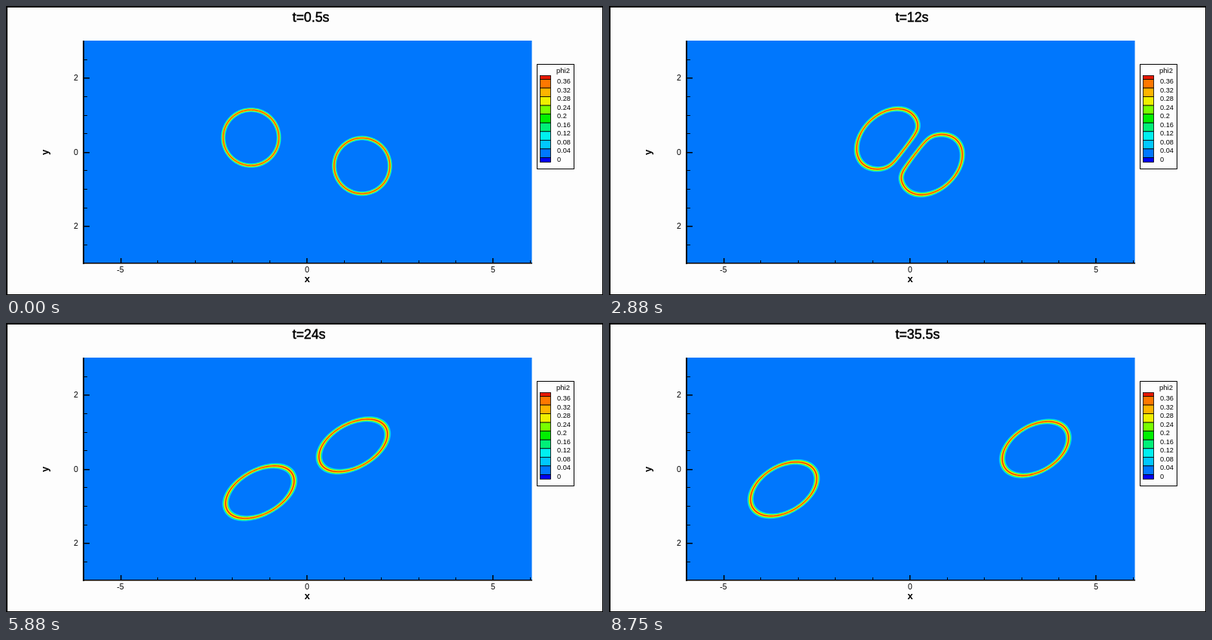
These frames come from a looping animation (793x384 px, 8.87 s). An HTML page:

```html
<!DOCTYPE html>
<html lang="en">
<head>
<meta charset="utf-8">
<title>Droplets in shear flow</title>
<style>
  html, body { margin: 0; width: 100%; height: 100%; overflow: hidden; background: #fdfdfd; }
  svg { display: block; width: 793px; height: 384px; }
  text { font-family: "Liberation Sans", Arial, sans-serif; fill: #000; }
</style>
</head>
<body>
<svg id="stage" viewBox="0 0 793 384" xmlns="http://www.w3.org/2000/svg"></svg>
<script>
const stage = document.getElementById('stage');
const ORIGIN = { x: 399.2, y: 193.7 };
const UNIT = { x: 49.45, y: 49.2 };
const PLOT = { left: 103, top: 46, right: 698.5, bottom: 341.5 };
const LOOP = 8870;
const STEP = 125;
const RAD = Math.PI / 180;

function add(tag, attrs, text) {
  const node = document.createElementNS('http://www.w3.org/2000/svg', tag);
  for (const key in attrs) node.setAttribute(key, attrs[key]);
  if (text !== undefined) node.textContent = text;
  return stage.appendChild(node);
}
const rect = (x, y, width, height, fill, extra) => add('rect', { x, y, width, height, fill, ...extra });
const label = (x, y, size, text, extra) => add('text', { x, y, 'font-size': size, ...extra }, text);

// Page frame and plot area
rect(0, 0, 793, 384, '#fdfdfd');
rect(0, 0, 793, 2, '#000');
rect(0, 0, 2, 384, '#000');
rect(792, 0, 1, 384, '#000');
rect(0, 383, 793, 1, '#000');
rect(PLOT.left, PLOT.top, PLOT.right - PLOT.left, PLOT.bottom - PLOT.top, '#0077fd');

// Contour layers from the outside to the ridge: colour and relative width
const LAYERS = [
  ['#00b4ff', 1], ['#00f0e0', 0.83], ['#3cf03c', 0.65],
  ['#f4f000', 0.48], ['#ffa000', 0.28], ['#e83000', 0.12]
].map(([fill, width]) => ({ width, path: add('path', { fill, 'fill-rule': 'evenodd' }) }));

// Axes
rect(102, 46, 2, 297, '#000');
rect(102, 341, 597, 1.5, '#000');
for (let i = -5; i <= 5; i++) {
  const major = i % 4 === 0;
  rect(104, Math.round(ORIGIN.y - i * UNIT.y / 2), major ? 7 : 4, major ? 1.5 : 1, '#000');
}
for (let i = -5; i <= 6; i++) {
  const size = i % 5 === 0 ? 6 : 3;
  rect(Math.round(ORIGIN.x + i * UNIT.x), 341 - size, size > 3 ? 1.5 : 1, size, '#000');
}
const centred = { 'text-anchor': 'middle' };
[['2', 99], ['0', 198], ['2', 296]].forEach(([text, y]) => label(93, y, 10.5, text, centred));
[['-5', 152], ['0', 400], ['5', 647]].forEach(([text, x]) => label(x, 353.5, 10.5, text, centred));
const bold = { ...centred, 'font-weight': 'bold' };
label(400, 367, 13, 'x', bold);
label(0, 0, 13, 'y', { ...bold, transform: 'translate(56 194.5) rotate(-90)' });

// Legend
rect(705.5, 77.5, 49, 139, '#fdfdfd', { stroke: '#000' });
label(731, 89, 9.5, 'phi2');
['#e81800', '#ff7800', '#ffb400', '#f0f000', '#78ff00', '#00f000',
  '#00f078', '#00f0f0', '#00c8ff', '#0078ff', '#0000f0'].forEach((fill, i) => {
  const top = i ? 97.5 + 11.55 * (i - 1) : 92.5;
  const bottom = i < 10 ? 97.5 + 11.55 * i : 207.5;
  rect(709.5, top, 14, bottom - top, fill, { stroke: '#000', 'stroke-width': 0.8 });
  if (i) label(732, 103 + 11.5 * (i - 1), 9.2, String((10 - i) * 4 / 100));
});

const title = label(380.5, 20.5, 17.8, '', { stroke: '#000', 'stroke-width': 0.5 });

// time, centre x and y, semi-axes, tilt, angle of the plane between the drops
const POSES = [
  [0.5, -73.7, -18.7, 37, 37, 45, 76],
  [3.5, -60.3, -16.5, 43, 31.5, 43, 69],
  [7, -46.8, -14.7, 45.8, 29.3, 41, 60],
  [12, -29.2, -17, 46.7, 33.3, 43, 53],
  [18, 1.8, -30.2, 49, 34, 27, 10],
  [21, 31, -33.2, 50, 31.5, 28, -30],
  [24, 62, -31, 49.5, 29, 29, -63],
  [28.5, 102, -29, 48.6, 30.3, 29, -72],
  [35.5, 167.2, -26.9, 48, 30.4, 31, -80]
];

function slope(i, col) {
  const rise = j => (POSES[j + 1][col] - POSES[j][col]) / (POSES[j + 1][0] - POSES[j][0]);
  if (i === 0) return rise(0);
  if (i === POSES.length - 1) return rise(i - 1);
  const before = rise(i - 1), after = rise(i);
  return before * after > 0 ? 2 * before * after / (before + after) : 0;
}

// Monotone cubic interpolation between poses
function poseAt(t) {
  let i = 0;
  while (i < POSES.length - 2 && t > POSES[i + 1][0]) i++;
  const from = POSES[i], to = POSES[i + 1];
  const span = to[0] - from[0], u = (t - from[0]) / span;
  return from.map((value, col) => {
    const ease = u * u * (3 - 2 * u);
    const bend = u * (1 - u) * ((1 - u) * slope(i, col) - u * slope(i + 1, col));
    return value + (to[col] - value) * ease + span * bend;
  });
}

// Tilted ellipse, softly flattened where it meets the plane between the drops
function outline([, cx, cy, a, b, tilt, plane]) {
  const GAP = 7.5, SOFT = 3, COUNT = 120;
  const cos = Math.cos(tilt * RAD), sin = Math.sin(tilt * RAD);
  const nx = -Math.sin(plane * RAD), ny = -Math.cos(plane * RAD);
  return Array.from({ length: COUNT }, (_, i) => {
    const angle = i / COUNT * 2 * Math.PI;
    const u = a * Math.cos(angle), v = b * Math.sin(angle);
    const x = cx + u * cos - v * sin, y = cy - u * sin - v * cos;
    const distance = x * nx + y * ny;
    const push = GAP + SOFT * Math.log1p(Math.exp((distance - GAP) / SOFT)) - distance;
    const end = Math.cos(angle) ** 2 * (a - b) / 18;
    return { x: x + push * nx, y: y + push * ny, half: 3.1 + 1.4 * end };
  });
}

function offsetPath(points, amount, sign) {
  const n = points.length;
  return 'M' + points.map((p, i) => {
    const prev = points[(i + n - 1) % n], next = points[(i + 1) % n];
    const dx = next.x - prev.x, dy = next.y - prev.y;
    const scale = amount * p.half / Math.hypot(dx, dy);
    const x = ORIGIN.x + sign * (p.x - dy * scale);
    const y = ORIGIN.y + sign * (p.y + dx * scale);
    return x.toFixed(2) + ' ' + y.toFixed(2);
  }).join('L') + 'Z';
}

function draw(step) {
  const t = 0.5 + step / 2;
  const points = outline(poseAt(t));
  title.textContent = `t=${t}s`;
  for (const { width, path } of LAYERS) {
    path.setAttribute('d', [1, -1].map(sign =>
      offsetPath(points, width, sign) + offsetPath(points, -width, sign)).join(''));
  }
}

// Steps start at multiples of 125 ms, rounded up to 10 ms
function stepAt(ms) {
  const step = Math.floor(ms / STEP);
  return Math.ceil(step * STEP / 10) * 10 > ms ? step - 1 : step;
}

let shown = -1;
const start = performance.now();
function tick() {
  const step = Math.min(70, stepAt((performance.now() - start) % LOOP));
  if (step !== shown) draw(shown = step);
  requestAnimationFrame(tick);
}
tick();
</script>
</body>
</html>
```
